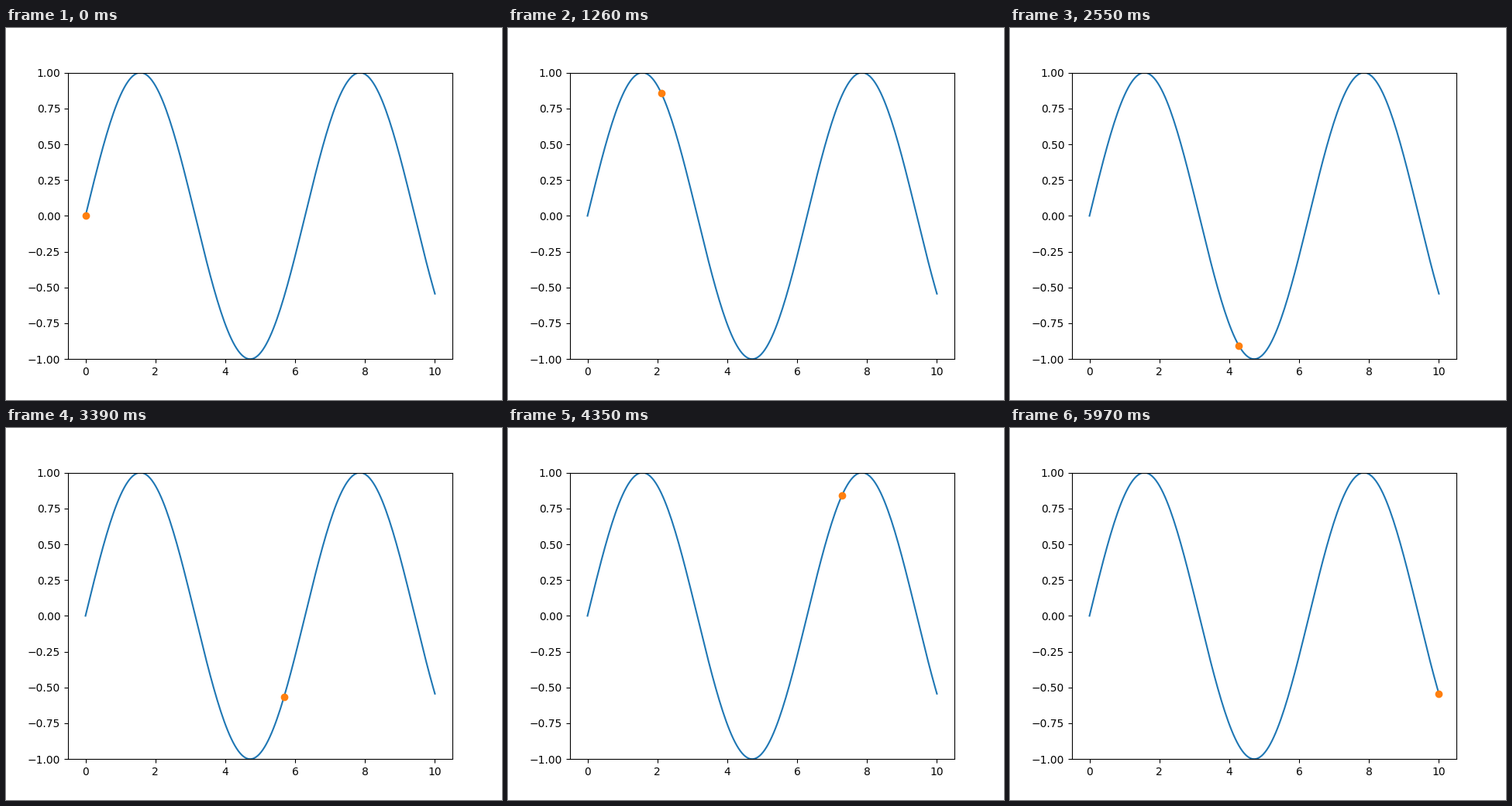
A matplotlib script for the animation above (6 s loop, 640x480 px).

```python
import numpy as np
import matplotlib.pyplot as plt
from matplotlib.animation import FuncAnimation

FRAMES = 200
INTERVAL = 30  # ms

x = np.linspace(0, 10, FRAMES)
y = np.sin(x)

fig, ax = plt.subplots(figsize=(6.4, 4.8), dpi=100)
ax.plot(x, y, color="tab:blue")
dot, = ax.plot(x[:1], y[:1], "o", color="tab:orange")
ax.set_xlim(-0.5, 10.5)
ax.set_ylim(-1, 1)


def update(i):
    dot.set_data([x[i]], [y[i]])
    return dot,


anim = FuncAnimation(fig, update, frames=FRAMES, interval=INTERVAL,
                     repeat=True, repeat_delay=0)
plt.show()
```
